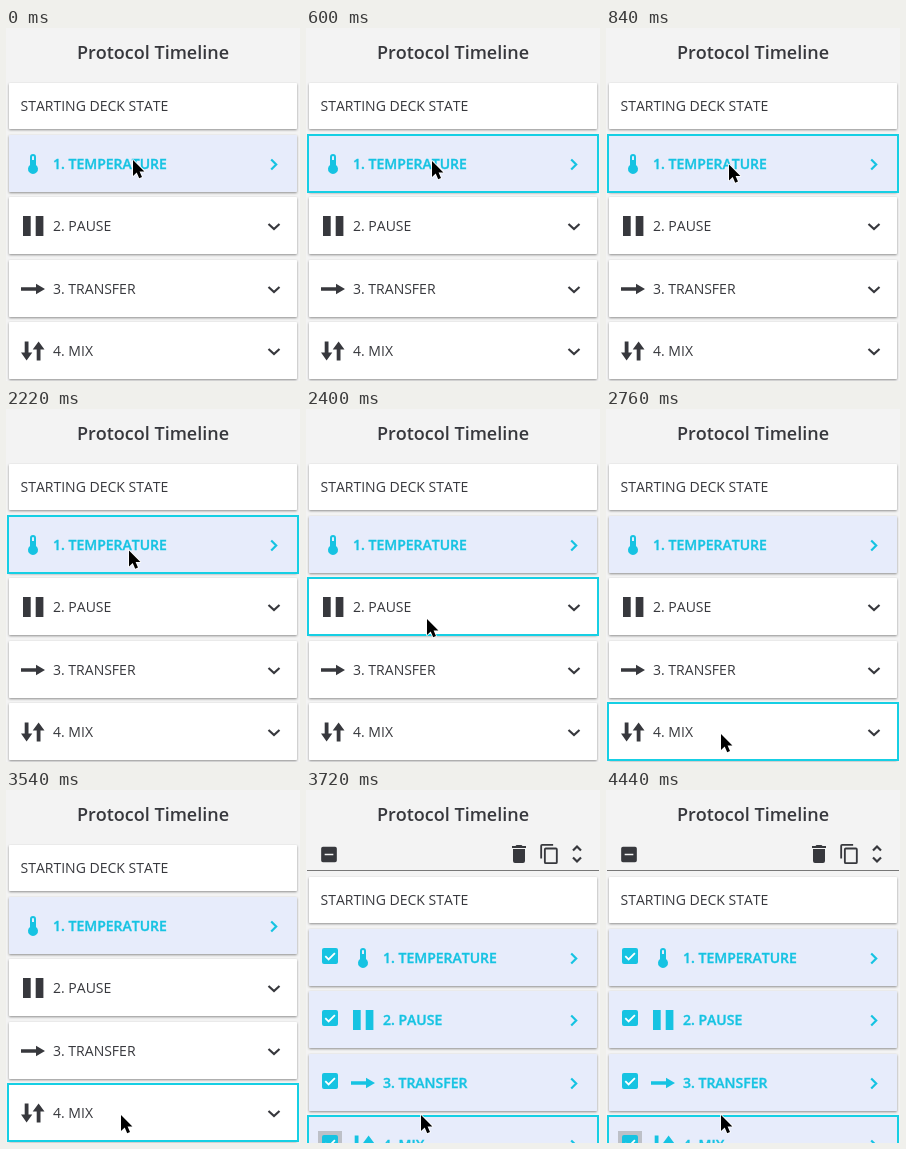
Write an HTML page that moves like this. It is 294 by 353 pixels and loops after 4920 ms.

```html
<!DOCTYPE html>
<html lang="en">
<head>
<meta charset="utf-8">
<title>Protocol Timeline</title>
<style>
  html, body { margin: 0; width: 100%; height: 100%; overflow: hidden; background: #f3f3f3; }
  svg { display: block; width: 294px; height: 353px; font: 14px "Open Sans", sans-serif; font-kerning: none; }
  .dark { color: #37383d; }
  .accent { color: #16c3e2; font-weight: 600; }
  .accent text { stroke: currentColor; stroke-width: .35; }
  .line { fill: none; stroke: currentColor; stroke-width: 2.2; }
</style>
</head>
<body>
<svg id="stage" viewBox="0 0 294 353" fill="currentColor" class="dark">
  <defs>
    <filter id="shadow" x="-5%" y="-10%" width="110%" height="125%">
      <feDropShadow dx="0" dy="1" stdDeviation="0.9" flood-color="#000" flood-opacity=".42"/>
    </filter>
  </defs>
  <rect width="294" height="353" fill="#f3f3f3"/>
  <text x="147" y="31" text-anchor="middle" font-size="18" font-weight="600">Protocol Timeline</text>

  <g id="toolbar">
    <path transform="translate(23 64.5) scale(.87) translate(-12 -12)" d="M17 13H7V11H17M19 3H5A2 2 0 0 0 3 5V19A2 2 0 0 0 5 21H19A2 2 0 0 0 21 19V5A2 2 0 0 0 19 3Z"/>
    <path transform="translate(201 52)" d="M19 4H15.5L14.5 3H9.5L8.5 4H5V6H19M6 19A2 2 0 0 0 8 21H16A2 2 0 0 0 18 19V7H6Z"/>
    <path transform="translate(243 64) scale(.92) translate(-11.5 -12)" d="M19 21H8V7H19M19 5H8A2 2 0 0 0 6 7V21A2 2 0 0 0 8 23H19A2 2 0 0 0 21 21V7A2 2 0 0 0 19 5M16 1H4A2 2 0 0 0 2 3V17H4V3H16Z"/>
    <path class="line" d="M267 60.5l4-4 4 4M267 67.5l4 4 4-4"/>
    <rect x="1" y="80" width="292" height="1" fill="#777"/>
  </g>

  <g id="list">
    <rect x="3" y="55" width="288" height="46" rx="1" fill="#fff" filter="url(#shadow)"/>
    <text x="14.5" y="83">STARTING DECK STATE</text>
  </g>
  <rect id="outline" x="2" width="290" height="57" fill="none" stroke="#16cfe4" stroke-width="2"/>
  <path id="cursor" d="M0 0V16L3.7 12.6L6.2 18.3L9 17.1L6.6 11.4H11.4Z" fill="#000" stroke="#fff" stroke-width="1.6" stroke-linejoin="round" paint-order="stroke"/>
</svg>
<script>
const LOOP = 4920, SELECT_ALL = 3720;
const byId = id => document.getElementById(id);
const rowTop = i => 107 + Math.floor(i * 62.5);

// Icons are centred on the origin.
const steps = [
  ["1. TEMPERATURE", `<path transform="translate(-12 -12)" fill-rule="evenodd" d="M15 13V5A3 3 0 0 0 9 5V13A5 5 0 1 0 15 13M12 4A1 1 0 0 1 13 5V8H11V5A1 1 0 0 1 12 4Z"/>`],
  ["2. PAUSE", `<path d="M-10-10h7.7v20h-7.7zM2.7-10h7.7v20h-7.7z"/>`],
  ["3. TRANSFER", `<path d="M-12-1.8H3V-5.3L12 0 3 5.3V1.8H-12Z"/>`],
  ["4. MIX", `<path d="M-8.3-9.5h3.8V1.5H-.7L-6.4 9.5-12 1.5h3.7zM3.7 9.5h3.8V-1.5h4L5.6-9.5-.3-1.5H3.7z"/>`]
];

// [time, tip x, tip y, outlined row or -1]
const pointer = [
  [0, 127, 132, -1],
  [600, 126, 133, 0], [660, 125, 134, 0], [720, 124, 135, 0], [840, 123, 136.5, 0],
  [2220, 123, 141.5, 0], [2280, 123, 155, 0], [2340, 122, 180, 0],
  [2400, 121, 210, 1], [2460, 120, 241, 1], [2520, 118, 273, 2],
  [2580, 117, 298, 2], [2640, 116, 314, 3], [2700, 115, 323, 3], [2760, 115, 325, 3]
];

byId("list").insertAdjacentHTML("beforeend", steps.map(([label, icon], i) => `
  <g class="row" transform="translate(0 ${rowTop(i)})">
    <rect class="card" x="3" y="0" width="288" height="57" rx="1" filter="url(#shadow)"/>
    <g class="check">
      ${i === 3 ? '<rect x="12" y="15" width="24" height="24" fill="#bdc0c7"/>' : ""}
      <rect x="16" y="19" width="16" height="16" rx="2"/>
      <path d="M19.3 27.2l3.3 3.3 6.3-6.3" fill="none" stroke="#fff" stroke-width="1.8"/>
    </g>
    <g class="content">
      <g transform="translate(27 29)">${icon}</g>
      <text x="47" y="34">${label}</text>
    </g>
    <path class="chevron line"/>
  </g>`).join(""));

const rows = [...document.querySelectorAll(".row")];

function draw(time) {
  const multi = time >= SELECT_ALL;
  const shift = multi ? 32 : 0;
  byId("toolbar").style.display = multi ? "" : "none";
  byId("list").setAttribute("transform", `translate(0 ${shift})`);

  rows.forEach((row, i) => {
    const selected = multi || i === 0;
    const part = name => row.querySelector("." + name);
    row.setAttribute("class", selected ? "row accent" : "row dark");
    part("card").setAttribute("fill", selected ? "#e7ecfb" : "#fff");
    part("check").style.display = multi ? "" : "none";
    part("content").setAttribute("transform", `translate(${multi ? 30 : 0} 0)`);
    part("chevron").setAttribute("d", selected ? "M265.2 24.5l5 5-5 5" : "M262.5 27l5.5 5 5.5-5");
  });

  const [, x, y, active] = pointer.findLast(key => key[0] <= time);
  const outline = byId("outline");
  outline.style.display = active < 0 ? "none" : "";
  outline.setAttribute("y", rowTop(Math.max(active, 0)) + shift);
  byId("cursor").setAttribute("transform", `translate(${x} ${y})`);
}

const start = performance.now();
function tick() {
  draw((performance.now() - start) % LOOP);
  requestAnimationFrame(tick);
}
tick();
</script>
</body>
</html>
```
